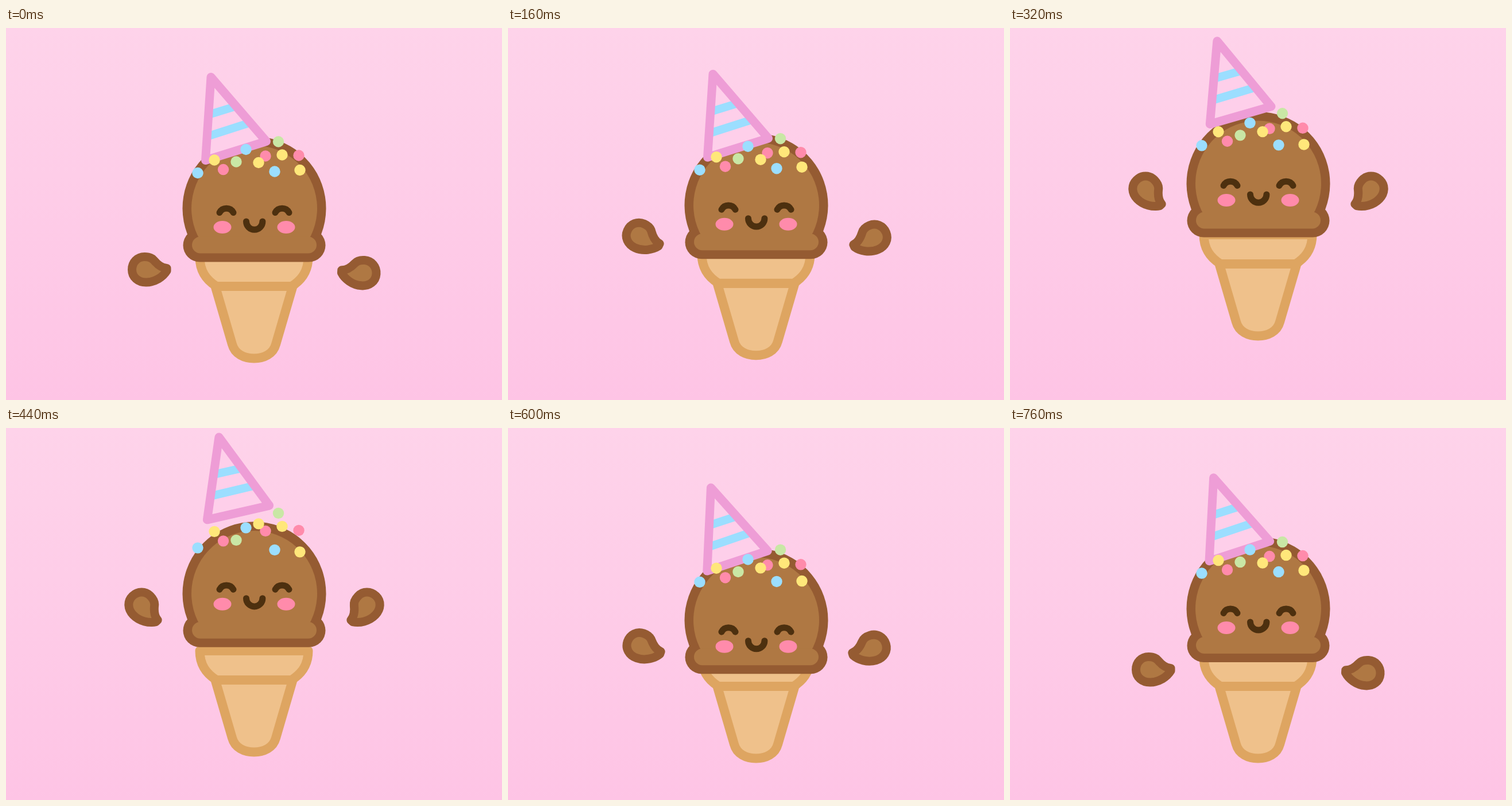
Recreate the animation shown at these times as an HTML page. Size 864 by 648 pixels, loop 800 ms.

```html
<!DOCTYPE html>
<html lang="en">
<head>
<meta charset="utf-8">
<title>Jumping ice cream</title>
<style>
  html, body { margin: 0; height: 100%; overflow: hidden; }
  svg { display: block; width: 100vw; height: 100vh; }
  .cone { fill: #efc18b; stroke: #dea561; stroke-width: 16; stroke-linejoin: round; }
  .arm { fill: #af7843; stroke: #955b32; stroke-width: 15; stroke-linejoin: round; }
  .dark { fill: #955b32; }
  .light { fill: #af7843; }
  .line { fill: none; stroke: #4d300f; stroke-width: 11; stroke-linecap: round; }
  .cheek { fill: #ff8bab; }
  .brim { fill: none; stroke: #ee9dd6; stroke-width: 15; stroke-linejoin: round; }
  .stripe { stroke: #9bdeff; stroke-width: 14.3; }
</style>
</head>
<body>
<svg viewBox="0 0 864 648" preserveAspectRatio="none">
  <defs>
    <linearGradient id="sky" x2="0" y2="1">
      <stop stop-color="#fed3ea"/>
      <stop offset="1" stop-color="#fec4e5"/>
    </linearGradient>
    <path id="arm" class="arm" transform="rotate(46 358 363.4)"
      d="M280 418.5C270 418 263 411 258 405C254 400 248 398.5 241.5 398.5
      C229 398.5 219.5 408 219.5 421C219.5 434 230 443 244 443C260 443 274 433 280 423Z"/>
    <path id="eye" class="line" d="M372 321.5A13.5 13.5 0 0 1 396 321.5"/>
  </defs>
  <rect width="864" height="648" fill="url(#sky)"/>

  <g id="body">
    <use id="left" href="#arm"/>
    <g transform="matrix(-1 0 0 1 865 0)"><use id="right" href="#arm"/></g>
    <g class="cone">
      <path d="M364.5 450L394 551C398.5 568 415 575.5 432 575.5S465.5 568 470 551L499.5 450Z"/>
      <path d="M337.5 399C337.5 424 349 439 366.5 450H497.5C515 439 526.5 424 526.5 399Z"/>
    </g>
  </g>

  <g id="scoop">
    <path class="dark" d="M325.1 378A125 125 0 1 1 539.9 378Z"/>
    <rect class="dark" x="308.5" y="349.5" width="248" height="58" rx="29"/>
    <path class="light" d="M343.6 378A109.5 109.5 0 1 1 521.4 378Z"/>
    <rect class="light" x="324" y="363.5" width="217" height="29" rx="14.5"/>
  </g>

  <g id="face">
    <use href="#eye"/>
    <use href="#eye" x="97"/>
    <ellipse class="cheek" cx="377" cy="347" rx="15.5" ry="11"/>
    <ellipse class="cheek" cx="488" cy="347" rx="15.5" ry="11"/>
    <path class="line" d="M418.5 337A14.2 14.2 0 0 0 446.9 337"/>
  </g>

  <g id="hat">
    <path fill="#fecfea" d="M357 85.5L347.5 230.5L453.5 197.5Z"/>
    <path class="stripe" d="M353 151L400 136.5M351 188.7L425 165"/>
    <path class="brim" d="M357 85.5L347.5 230.5L453.5 197.5Z"/>
  </g>

  <g id="sprinkles"></g>
</svg>
<script>
const LOOP = 800, STEP = 40, LEAD = 12;
const $ = id => document.getElementById(id);
const move = (el, y, turn = '') => el.setAttribute('transform', `translate(0 ${y}) ${turn}`);

// Smooth 0 to 1 between two times
const ease = (t, from, to) => {
  const u = Math.min(1, Math.max(0, (t - from) / (to - from)));
  return u * u * (3 - 2 * u);
};
// Rise to 1 and fall back to 0
const bump = (t, start, top, fall, end) => ease(t, start, top) - ease(t, fall, end);

const FLOAT = 248, PEAK = 460, SQUASH = 618, REST = 775;
// Loose parts float up near the top of the jump, then sink on landing
const lag = (t, up, down) => -up * bump(t, FLOAT, PEAK, PEAK, SQUASH) + down * bump(t, PEAK, SQUASH, SQUASH, REST);

// Each dot: x, y, hop height
const HOP = 6;
const sprinkles = Object.entries({
  '#9bdeff': [[334, 252.5, 3], [418, 211.5, 2], [468, 250, 2]],
  '#ff8bab': [[378.5, 246.5, 4], [452, 223, 3], [510, 222, 3]],
  '#c9e7a5': [[401, 233, 2], [474.5, 198, 4]],
  '#ffe77a': [[363, 230, 4], [440, 234.5, 7], [481, 221, 4], [512, 247.5, 1]]
}).flatMap(([fill, dots]) => dots.map(([cx, cy, hops]) => {
  const dot = document.createElementNS('http://www.w3.org/2000/svg', 'circle');
  for (const [name, value] of Object.entries({ cx, cy, r: 9.7, fill })) dot.setAttribute(name, value);
  $('sprinkles').append(dot);
  return { dot, height: hops * HOP };
}));

function draw() {
  const t = Math.floor((performance.now() + LEAD) / STEP) * STEP % LOOP;
  const bodyY = -39 * bump(t, 112, 320, 320, 505);
  const scoopY = bodyY + lag(t, 15, 22);
  const faceY = bodyY + lag(t, 30, 36);
  const hatY = scoopY - 41 * bump(t, FLOAT, 400, 452, 630);
  const tilt = 4.5 * ease(t, FLOAT, PEAK) - 6 * ease(t, 498, SQUASH) + 1.5 * ease(t, 720, LOOP);
  const toss = 1.05 * bump(t, FLOAT, 470, 493, 653);
  const drop = 1 - bump(t, 0, 305, 458, 715);

  move($('body'), bodyY);
  move($('left'), 0, `rotate(${-46 * drop} 358 363.4)`);
  move($('right'), 0, `rotate(${-50 * drop} 354 366.5)`);
  move($('scoop'), scoopY);
  move($('face'), faceY);
  move($('hat'), hatY, `rotate(${tilt} 400.5 266)`);
  for (const { dot, height } of sprinkles) move(dot, scoopY - height * toss);
  requestAnimationFrame(draw);
}
draw();
</script>
</body>
</html>
```
